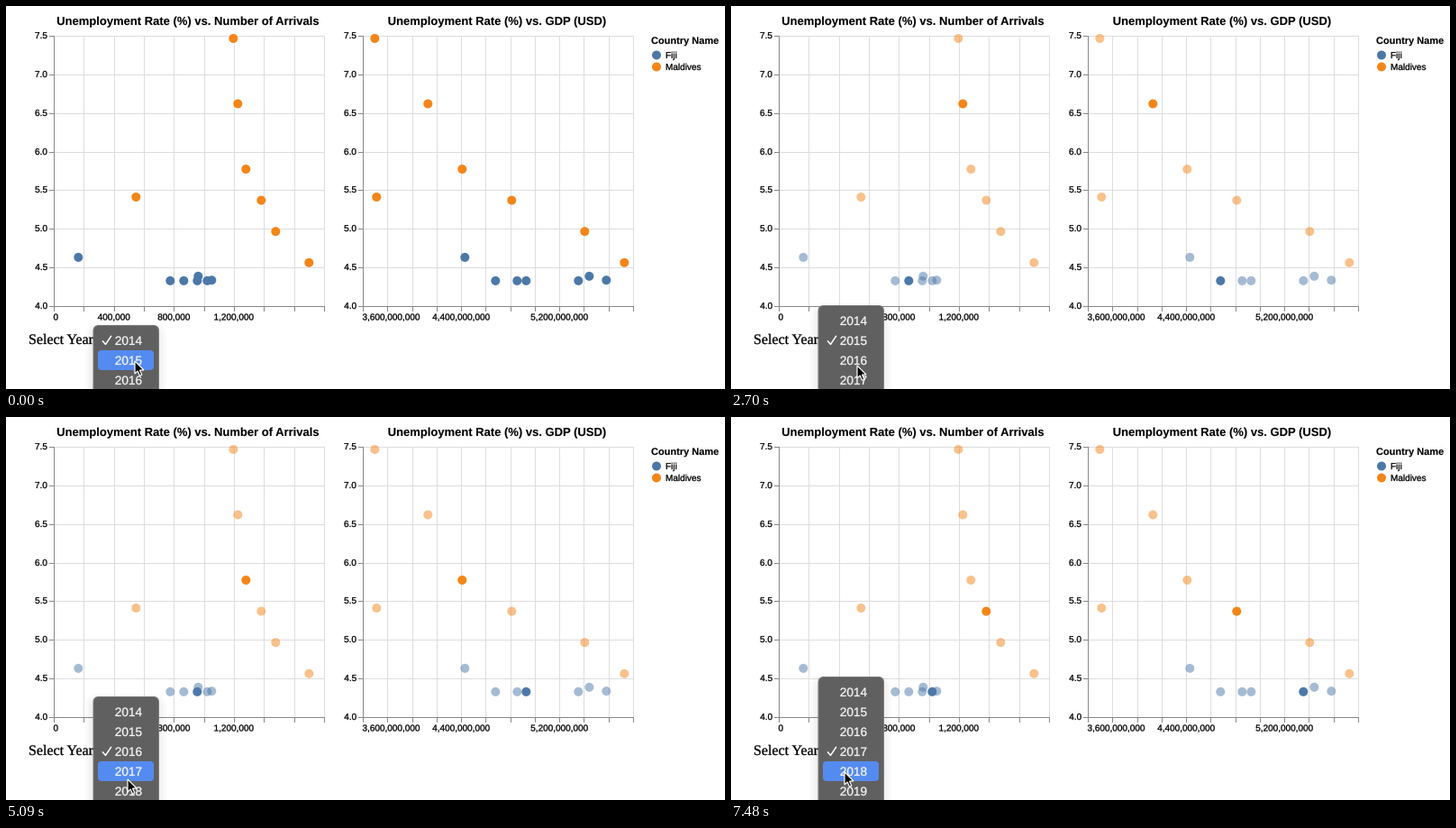
Write a matplotlib script that moves like this. It is 798 by 425 pixels and loops after 8 s.

```python
import matplotlib.pyplot as plt
from matplotlib.animation import FuncAnimation
from matplotlib.patches import Circle, FancyBboxPatch, PathPatch, Polygon
from matplotlib.textpath import TextPath
from matplotlib.transforms import Affine2D

W, H = 798, 425
STEP, LOOP = 50, 8000
TICK = 150  # the pointer and the menu advance in steps of this many ms
PX = 0.72  # points per pixel at 100 dpi

BLUE, ORANGE = "#4c78a8", "#f58518"
AXIS, GRID = "#888888", "#dddddd"
YEARS = range(2014, 2021)
LAST = len(YEARS) - 1
ROW, ROW_TOP = 22, 360  # menu row height, top of the checked row
TOP, SIDE = 32.5, 300  # top and side length of both charts

# Yearly x positions: arrivals (left chart) and GDP (right chart)
FIJI_X = ([182, 197, 212, 223, 228, 213, 80],
          [567, 543, 577, 635, 666, 647, 509])
MALDIVES_X = ([252, 257, 266, 283, 299, 336, 144],
              [409, 468, 506, 561, 642, 686, 411])

# Visits to the menu: opened, item clicked, closed
VISITS = [(0, 450, 450), (1800, 2700, 3150), (4490, 5380, 5830),
          (6880, LOOP, LOOP)]

# Pointer moves: start, number of steps, end point
START = (143, 394)
MOVES = [(1050, 2, 136, 361), (2100, 2, 140, 399), (3600, 3, 138, 357),
         (4190, 1, 132, 370), (4640, 4, 135, 402), (6430, 3, 128, 369),
         (7180, 3, 126, 394)]

ARROW = [(0, 0), (0, 14), (3.2, 11), (5.5, 16.3), (7.8, 15.3),
         (5.5, 10.1), (10, 10)]

fig = plt.figure(figsize=(W / 100, H / 100), dpi=100, facecolor="white")
ax = fig.add_axes([0, 0, 1, 1])
ax.set_xlim(0, W)
ax.set_ylim(H, 0)
ax.axis("off")


def text(x, y, s, size, align=0, family="Liberation Sans", weight="normal",
         color="black", **kw):
    """Outlined text; align is 0 for left, 0.5 for centre, 1 for right."""
    path = TextPath((0, 0), s, size=size,
                    prop={"family": family, "weight": weight})
    box_ = path.get_extents()
    shift = align * (box_.x0 + box_.x1)
    place = Affine2D().scale(1, -1).translate(x - shift, y)
    stroke = 0.1 if weight == "bold" else 0.3
    return ax.add_patch(PathPatch(path, fc=color, ec=color, lw=stroke * PX,
                                  transform=place + ax.transData,
                                  snap=False, **kw))


def line(xs, ys, color, width=1.0, **kw):
    return ax.plot(xs, ys, color=color, lw=width * PX, **kw)[0]


def box(x, y, w, h, r, **kw):
    style = f"round,pad=0,rounding_size={r}"
    return ax.add_patch(FancyBboxPatch((x, y), w, h, boxstyle=style, **kw))


def dot(x, y, color):
    return ax.add_patch(Circle((x, y), 5, fc=color, lw=0, zorder=3))


def pixel(v):
    return int(v) + 0.5


def chart(left, title, cells, first, step, skip):
    """Grid, axes and title; every skip-th vertical line gets a label."""
    right, bottom = left + SIDE, TOP + SIDE
    for k in range(cells + 1):
        x = left + SIDE * k / cells
        line([pixel(x)] * 2, [TOP, bottom], GRID, zorder=1)
        line([pixel(x)] * 2, [bottom, bottom + 5], AXIS, zorder=2)
        if k % skip == 0 and k < cells - 1:
            label = f"{first + step * k:,}"
            if k == 0:
                text(x, 348.5, label, 10)
            else:
                text(x + 0.5, 348.5, label, 10, align=0.5)
    for k in range(8):
        y = pixel(TOP + SIDE * k / 7)
        line([left, right], [y, y], GRID, zorder=1)
        line([left - 5, left], [y, y], AXIS, zorder=2)
        text(left - 6.5, y + 3.5, f"{7.5 - k / 2:.1f}", 10, align=1)
    line([left, left], [TOP, bottom], AXIS, zorder=2)
    line([left, right], [bottom, bottom], AXIS, zorder=2)
    text(left + 149.5, 21, title, 13, align=0.5, weight="bold")


def fiji_y(k):
    # Flat for years, with a late rise
    return 304.9 - 26 * (k / LAST) ** 9


def maldives_y(k):
    # Fast fall, then a slower one, then a jump back up
    if k == LAST:
        return 212
    return 36 + 72.5 * min(k, 2) + 34.6 * max(k - 2, 0)


chart(52.5, "Unemployment Rate (%) vs. Number of Arrivals", 9,
      0, 200_000, 2)
chart(395.5, "Unemployment Rate (%) vs. GDP (USD)", 11,
      3_600_000_000, 200_000_000, 4)

text(716, 42, "Country Name", 11, weight="bold")
for y, name, color in [(55, "Fiji", BLUE), (68, "Maldives", ORANGE)]:
    dot(722, y - 0.5, color)
    text(732, y + 3, name, 10)

text(25, 375, "Select Year:", 16, family="Liberation Serif")

dots = []
for columns, rate, color in [(FIJI_X, fiji_y, BLUE),
                             (MALDIVES_X, maldives_y, ORANGE)]:
    for xs in columns:
        for k, x in enumerate(xs):
            dots.append((YEARS[k], dot(x + 0.3, rate(k), color)))

# Closed drop-down
frame = box(106.5, 361.5, 50, 17, 3, fc="white", zorder=4)
line([145.3, 149.2, 153.1], [368, 372, 368], "black", 1.2, zorder=5)

arrow = ax.add_patch(Polygon(ARROW, fc="black", ec="white", lw=1.2 * PX,
                             joinstyle="miter", zorder=20))
passing = []  # artists that live for one frame


def draw_menu(checked, hovered, alpha):
    """Open list, placed so that the checked year stays in one spot."""
    top = ROW_TOP - ROW * (checked - YEARS[0])
    height = ROW * len(YEARS) + 10
    for grow in (3, 6, 9):
        passing.append(box(97 - grow, top + 1 - grow, 72 + 2 * grow,
                           height + 2 * grow, 6 + grow, fc="black", lw=0,
                           alpha=0.02 * alpha, zorder=9))
    passing.append(box(97, top - 5.5, 72.5, height, 6, fc="#616060",
                       ec="#7c7c7c", lw=PX, alpha=alpha, zorder=10))
    for k, year in enumerate(YEARS):
        y = top + ROW * k
        if year == hovered:
            passing.append(box(102, y, 62, ROW, 4, fc="#548bf0", lw=0,
                               alpha=alpha, zorder=11))
        if year == checked:
            passing.append(line([107.5, 110.5, 116.5],
                                [y + 12, y + 15.5, y + 6.5],
                                "white", 1.5, alpha=alpha, zorder=12))
        passing.append(text(120.8, y + 16, str(year), 13.6, color="#f4f4f4",
                            alpha=alpha, zorder=12))


def pointer(t):
    x, y = START
    for start, steps, to_x, to_y in MOVES:
        if t >= start:
            part = min(1, ((t - start) // TICK + 1) / steps)
            x += (to_x - x) * part
            y += (to_y - y) * part
    return x, y


def draw(i):
    t = i * STEP + 40
    x, y = pointer(t)
    year = YEARS[sum(t >= closed + TICK for _, _, closed in VISITS)]

    for dot_year, patch in dots:
        # Everything is solid until the first choice is made
        patch.set_alpha(1 if year in (YEARS[0], dot_year) else 0.5)

    while passing:
        passing.pop().remove()
    passing.append(text(110, 375, str(year), 13.5, zorder=5))

    focused = False
    for opened, clicked, closed in VISITS:
        focused |= opened - TICK <= t < opened
        if opened <= t < closed:
            # After the click: highlight off, on again, then fade out
            phase = (t - clicked) // TICK
            hovered = None if phase == 0 else year + (y - ROW_TOP) // ROW
            draw_menu(year, hovered, 0.45 if phase == 2 else 1)
    frame.set_edgecolor("#1265d2" if focused else "#1c1c1c")
    frame.set_linewidth((2 if focused else 1) * PX)

    arrow.set_xy([(x + dx, y + dy) for dx, dy in ARROW])


anim = FuncAnimation(fig, draw, frames=LOOP // STEP, interval=STEP,
                     repeat=True, cache_frame_data=False)
plt.show()
```
